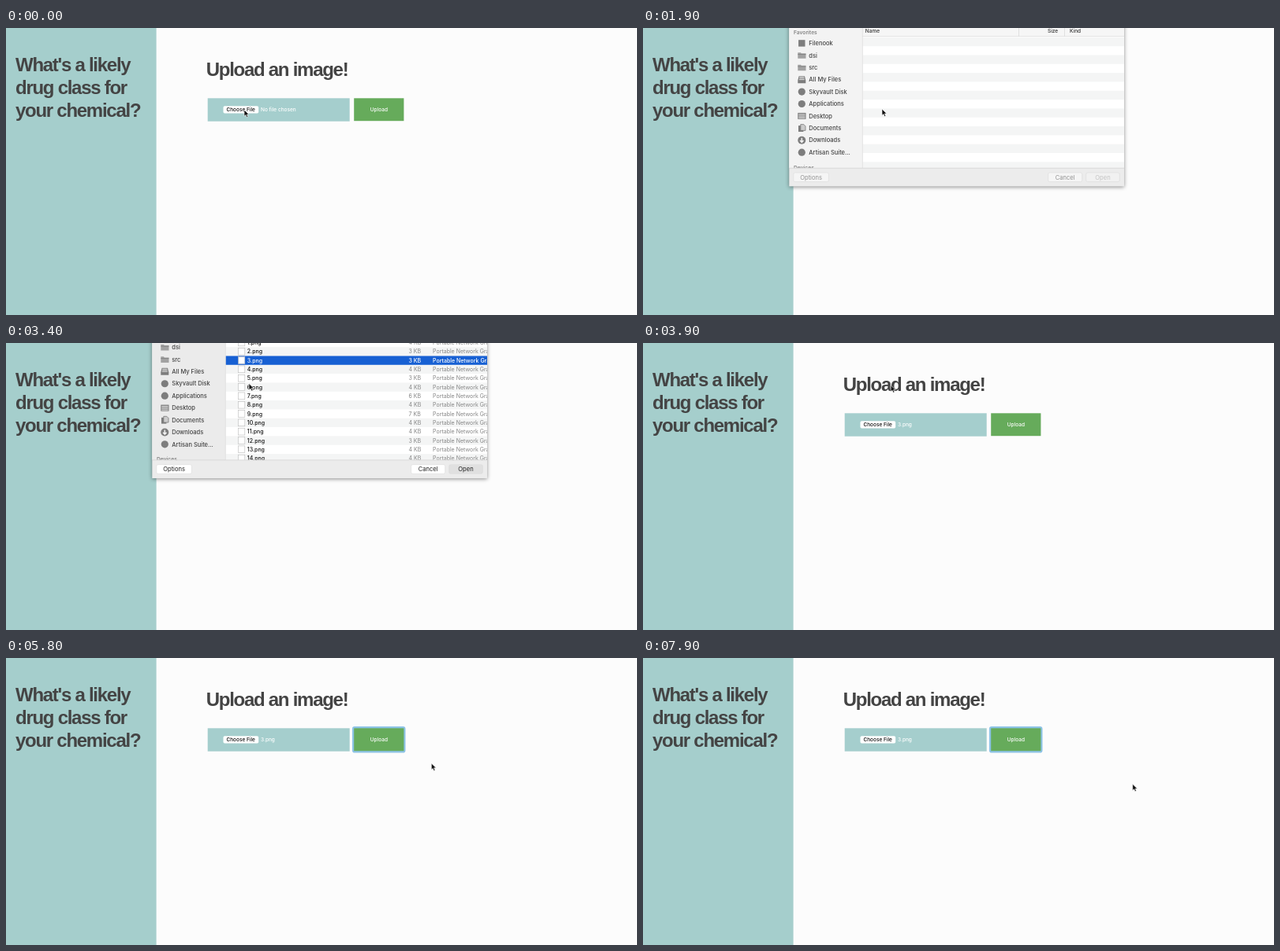
Animation, 800 px wide and 365 px high, one loop 8 s. Source, as an HTML page:

```html
<!DOCTYPE html>
<html lang="en">
<head>
<meta charset="utf-8">
<title>Upload an image</title>
<style>
  html, body { margin: 0; width: 100%; height: 100%; overflow: hidden; background: #fcfcfc; }
  svg { display: block; width: 100%; height: 100%; font-family: Inter, Roboto, sans-serif; }
  .head { font: bold 24px "Liberation Sans", Arial, sans-serif; letter-spacing: -1.27px; fill: #444; }
  .form { font-size: 6.5px; font-weight: 500; fill: #fff; }
  .side { font-size: 7.5px; font-weight: 500; fill: #444; }
  .group { font-size: 6.7px; font-weight: 600; fill: #858585; }
  .col { font-size: 6.5px; font-weight: 500; fill: #333; }
  .row { font-size: 7px; font-weight: 500; fill: #111; }
  .dim { font-weight: 400; fill: #858585; }
  .picked { fill: #fff; }
  .btn { font-size: 7.6px; text-anchor: middle; }
  #sheet { filter: drop-shadow(0 1.5px 2.5px rgba(0, 0, 0, .45)); }
  #icons { fill: #7d7d7d; }
</style>
</head>
<body>
<svg viewBox="0 0 800 365">
  <defs>
    <clipPath id="body"><rect x="185" y="-20" width="425" height="198"/></clipPath>
  </defs>

  <rect width="800" height="365" fill="#fcfcfc"/>
  <rect width="190.6" height="365" fill="#a5cecc"/>
  <g class="head">
    <text x="12" y="55">What's a likely</text>
    <text x="12" y="84">drug class for</text>
    <text x="12" y="113">your chemical?</text>
    <text x="253.7" y="60.5">Upload an image!</text>
  </g>

  <rect x="255.7" y="89.3" width="180" height="29.4" fill="#a5cecd"/>
  <rect x="275.5" y="99.2" width="44.7" height="9.4" rx="1.8" fill="#fff"/>
  <text class="form" x="279.4" y="106.3" style="fill:#111">Choose File</text>
  <text class="form" id="chosen" x="323" y="106.3"></text>
  <rect id="ring" x="440" y="88" width="65.4" height="31.4" rx="2" fill="#8dc3e6" stroke="#8dc3e6" stroke-width="2.2"/>
  <rect x="441.2" y="89.3" width="63.2" height="28.9" fill="#66ab5b"/>
  <text class="form" x="461.8" y="106.3">Upload</text>

  <g id="sheet">
    <rect x="185.3" y="-20" width="424.7" height="221.3" fill="#ececec"/>
    <g clip-path="url(#body)">
      <rect id="sidebar" x="185.3" y="-20" width="93" height="198"/>
      <rect x="278.3" y="-20" width="332" height="198" fill="#fff"/>
      <g id="stripes"></g>
      <g id="files"></g>
      <rect x="278.3" y="-20" width="332" height="30.6" fill="#f6f6f6"/>
      <path d="M278.3 10.6H610M476.5-5V10.6M534.5-5V10.6M278.3-5V178" stroke="#d2d2d2" stroke-width=".6"/>
      <text class="col" x="281.8" y="6.2">Name</text>
      <text class="col" x="513" y="6.2">Size</text>
      <text class="col" x="541" y="6.2">Kind</text>
      <text class="group" x="191" y="8.2">Favorites</text>
      <text class="group" x="191" y="179.6">Devices</text>
      <g id="icons"></g>
      <g id="places"></g>
    </g>
    <path d="M185.3 178.2H610" stroke="#cfcfcf" stroke-width=".7"/>
    <g id="buttons"></g>
  </g>

  <g id="cursor">
    <path id="arrow" d="M0 0V8.2L1.9 6.5 3.2 9.5 4.7 8.8 3.4 5.9H6Z" fill="#111" stroke="#fff" stroke-width=".6"/>
    <path id="hand" d="M-1 .3Q0-.7 .9.3L1.5 3.3Q2.5 2.5 3.2 3.4 4.2 2.8 4.8 3.8 6 3.5 6.1 4.9V7L5.2 9.6H.4L-2.3 5.8Q-2.2 4.4-.4 5.3Z" fill="#fff" stroke="#111" stroke-width=".9" stroke-linejoin="round"/>
  </g>
</svg>

<script>
const $ = id => document.getElementById(id);
const show = (id, on) => $(id).style.display = on ? '' : 'none';
const text = (cls, x, y, s) => `<text class="${cls}" x="${x}" y="${y}">${s}</text>`;

const LOOP = 8000, STEP = 100, SHEET = 202;
const PITCH = 11.32, FIRST = 11.85, PICK = 3;
const sizes = [4, 4, 3, 3, 4, 3, 4, 6, 4, 7, 4, 4, 3, 4, 4];

// Icons are drawn around the origin, about 10 units wide
const disc = '<circle r="4.6"/>';
const folder = '<path d="M-5-3.6h3.6l1 1.1H5.2V4H-5z" fill="#a2a2a2"/><path d="M-5-1.3H5.2" stroke="#777" stroke-width=".7"/>';
const tray = '<path d="M-3.7-4.5h7.4L5 1V4.5H-5V1z"/><path d="M-3-3.2h6M-3.2-1.6h6.4M-3.5 0h7" stroke="#eee" stroke-width=".8"/>';
const desktop = '<rect x="-5" y="-4" width="10.2" height="8"/><path d="M-4-2.2H4.2M-4 2.7H4.2" stroke="#eee" stroke-width=".8"/><rect x="-4" y="-1.4" width="8.2" height="3.3" fill="#b5b5b5"/>';
const papers = '<rect x="-4.3" y="-3.2" width="6.4" height="7.8"/><path d="M-1.5-4.7H2.5L4.7-2.5V3H-1.5z" fill="#ccc" stroke="#777" stroke-width=".8"/>';
const download = '<circle r="5"/><path d="M0-3V2M-2.2.3 0 2.7 2.2.3" fill="none" stroke="#f2f2f2" stroke-width="1.5"/>';

const places = [
  ['Filenook', '<rect x="-4.2" y="-4.2" width="8.4" height="8.4"/>'],
  ['dsi', folder], ['src', folder], ['All My Files', tray],
  ['Skyvault Disk', disc], ['Applications', disc], ['Desktop', desktop],
  ['Documents', papers], ['Downloads', download], ['Artisan Suite...', disc]
];
places.forEach(([name, icon], i) => {
  const y = 19.4 + i * 15.42;
  $('icons').innerHTML += `<g transform="translate(201.3 ${y})">${icon}</g>`;
  $('places').innerHTML += text('side', 210.3, y + 2.7, name);
});

for (let i = 0; i < 15; i += 2)
  $('stripes').innerHTML += `<rect x="278.6" y="${FIRST + i * PITCH}" width="332" height="${PITCH}" fill="#f4f5f5"/>`;

function fileRows(picked) {
  return sizes.map((kb, i) => {
    const top = FIRST + i * PITCH, base = top + 8.2, on = picked && i === PICK;
    const dim = on ? 'row picked' : 'row dim';
    return (on ? `<rect x="278.6" y="${top}" width="332" height="${PITCH}" fill="#1760d3"/>` : '') +
      `<rect x="294.6" y="${top + 1.2}" width="8.2" height="8.8" fill="#fff" stroke="#bbb" stroke-width=".6"/>` +
      text(on ? 'row picked' : 'row', 305.8, base, i + '.png') +
      text(dim, 510.5, base, kb + ' KB') +
      text(dim, 541, base, 'Portable Network Graphics');
  }).join('');
}

function buttonRow(ready, picked) {
  const button = (x, w, label, ink, fill) =>
    `<rect x="${x}" y="184" width="${w}" height="11.6" rx="2" fill="${fill}" stroke="#d6d6d6" stroke-width=".5"/>` +
    `<text class="btn" x="${x + w / 2}" y="192.6" fill="${ink}">${label}</text>`;
  const ink = ready ? '#222' : '#929292', fill = ready ? '#fff' : '#f5f5f5';
  return button(190.8, 44.6, 'Options', ink, fill) +
    button(513.7, 43, 'Cancel', ink, fill) +
    button(561.7, 42.6, 'Open', picked ? '#222' : '#c4c4c4', picked ? '#e0e0e0' : '#f1f1f1');
}

const progress = (t, from, span) => Math.min(1, Math.max(0, (t - from) / span));
const cubic = u => u < .5 ? 4 * u ** 3 : 1 - 4 * (1 - u) ** 3;
const smooth = u => u * u * (3 - 2 * u);

// time, x, y of the pointer tip
const path = [
  [0, 302, 104], [1000, 302, 104], [1300, 303, 103], [2100, 303, 103], [2700, 308, 51.5],
  [3800, 308, 51.5], [4700, 486.5, 116.8], [5500, 486.5, 116.8], [6200, 620.7, 160.3], [LOOP, 620.7, 160.3]
];
function pointer(t) {
  const i = path.findIndex(p => p[0] > t);
  const [t0, x0, y0] = path[i - 1], [t1, x1, y1] = path[i];
  const u = smooth(progress(t, t0, t1 - t0));
  return [x0 + (x1 - x0) * u, y0 + (y1 - y0) * u];
}

let lastState;
function draw(t) {
  const open = cubic(progress(t, 1190, 407)) - cubic(progress(t, 3300, 302));
  show('sheet', open > .004);
  $('sheet').setAttribute('transform', `translate(0 ${(open - 1) * SHEET})`);

  const ready = t >= 2000, picked = t >= 2800;
  const state = `${ready}${picked}`;
  if (state !== lastState) {
    lastState = state;
    $('files').innerHTML = ready ? fileRows(picked) : '';
    $('buttons').innerHTML = buttonRow(ready, picked);
    $('sidebar').setAttribute('fill', ready ? '#ebebeb' : '#f3f3f3');
  }

  $('chosen').textContent = t < 3700 ? 'No file chosen' : PICK + '.png';
  show('ring', t >= 5300);

  const [x, y] = pointer(t);
  const over = x > 441 && x < 504 && y > 89 && y < 118;
  $('cursor').setAttribute('transform', `translate(${x} ${y})`);
  show('arrow', !over);
  show('hand', over);
}

const start = performance.now();
function tick() {
  const t = (performance.now() - start) % LOOP;
  draw(Math.floor(t / STEP) * STEP);
  requestAnimationFrame(tick);
}
tick();
</script>
</body>
</html>
```
